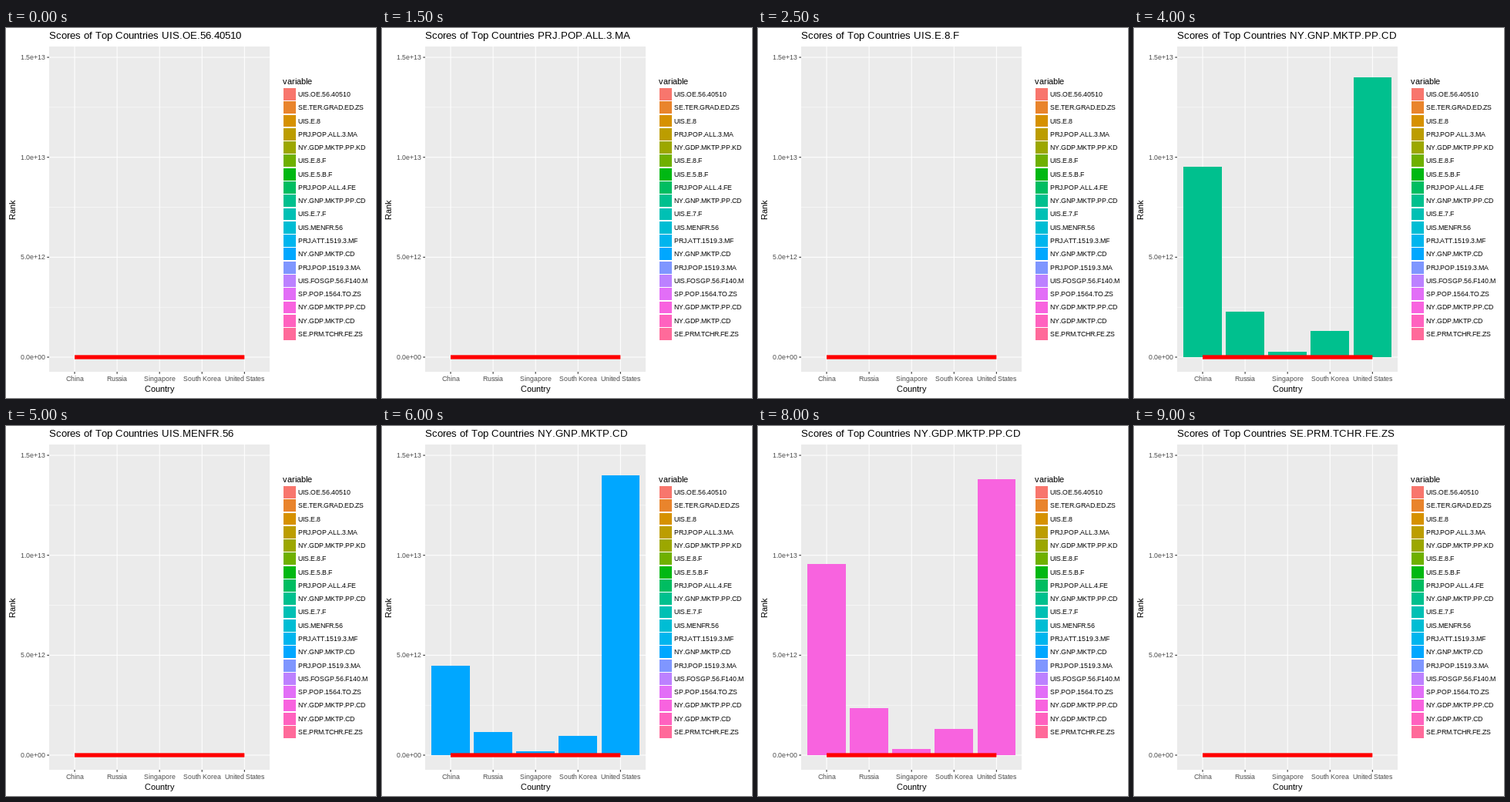
A matplotlib script that plays this animation: 480 px wide and 480 px high, repeating every 9.5 s.

```python
import numpy as np
import matplotlib.pyplot as plt
from matplotlib.animation import FuncAnimation
from matplotlib.patches import Rectangle
from matplotlib.textpath import text_to_path

plt.rcParams["font.family"] = "Liberation Sans"
plt.rcParams["toolbar"] = "None"

SIZE, DPI = 480, 72
LEFT, TOP, RIGHT, BOTTOM = 56, 24, 342, 446
ZERO, PER_TRILLION = 427.0, 25.93
UNIT = 55.08
COUNTRIES = ["China", "Russia", "Singapore", "South Korea", "United States"]
CENTERS = [55.98 + UNIT * (i + 0.6) for i in range(5)]

CODES = """UIS.OE.56.40510 SE.TER.GRAD.ED.ZS UIS.E.8 PRJ.POP.ALL.3.MA
NY.GDP.MKTP.PP.KD UIS.E.8.F UIS.E.5.B.F PRJ.POP.ALL.4.FE NY.GNP.MKTP.PP.CD
UIS.E.7.F UIS.MENFR.56 PRJ.ATT.1519.3.MF NY.GNP.MKTP.CD PRJ.POP.1519.3.MA
UIS.FOSGP.56.F140.M SP.POP.1564.TO.ZS NY.GDP.MKTP.PP.CD NY.GDP.MKTP.CD
SE.PRM.TCHR.FE.ZS""".split()

# Trillions per country; every other indicator is too small to show.
VALUES = {
    4: (10.3, 2.92, 0.34, 1.42, 14.79),
    8: (9.52, 2.27, 0.27, 1.31, 14.0),
    12: (4.47, 1.16, 0.19, 0.96, 14.0),
    16: (9.56, 2.35, 0.31, 1.31, 13.8),
    17: (4.50, 1.19, 0.19, 0.97, 13.8),
}


def hcl(hue, chroma=100, lum=65):
    """Polar CIE-LUV colour as clipped sRGB."""
    a = np.radians(hue)
    xn, yn, zn = 95.047, 100.0, 108.883
    d = xn + 15 * yn + 3 * zn
    u = chroma * np.cos(a) / (13 * lum) + 4 * xn / d
    v = chroma * np.sin(a) / (13 * lum) + 9 * yn / d
    y = ((lum + 16) / 116) ** 3
    x = 9 * y * u / (4 * v)
    z = y * (12 - 3 * u - 20 * v) / (4 * v)
    m = np.array([[3.240479, -1.537150, -0.498535],
                  [-0.969256, 1.875992, 0.041556],
                  [0.055648, -0.204043, 1.057311]])
    rgb = np.clip(m @ [x, y, z], 0, 1)
    return tuple(np.where(rgb > 0.00304, 1.055 * rgb ** (1 / 2.4) - 0.055, 12.92 * rgb))


COLORS = [hcl(15 + 360 * i / len(CODES)) for i in range(len(CODES))]

fig = plt.figure(figsize=(SIZE / DPI, SIZE / DPI), dpi=DPI, facecolor="white")
ax = fig.add_axes([0, 0, 1, 1])
ax.set_xlim(0, SIZE)
ax.set_ylim(SIZE, 0)
ax.axis("off")


def rect(x0, y0, x1, y1, color, z):
    x0, y0, x1, y1 = (int(v + 0.5) for v in (x0, y0, x1, y1))
    return ax.add_patch(Rectangle((x0, y0), x1 - x0, y1 - y0, fc=color, lw=0,
                                  antialiased=False, zorder=z))


def line(xs, ys, color, width, z):
    ax.plot(xs, ys, color=color, lw=width, solid_capstyle="butt", snap=False, zorder=z)


def label(s, x, y, size, color="black", align=0.0, vertical=False):
    """Set text on whole-pixel advances; returns the glyphs and the end of the run."""
    glyphs = [ax.text(0, 0, ch, size=size, color=color, va="baseline", ha="left",
                      rotation=90 if vertical else 0, rotation_mode="anchor", zorder=9)
              for ch in s]
    steps = [int(text_to_path.get_text_width_height_descent(
        g.get_text(), g.get_fontproperties(), False)[0] + 0.51) for g in glyphs]
    shift = align * sum(steps)
    pen = int(y + shift + 0.5) if vertical else int(x - shift + 0.5)
    for g, step in zip(glyphs, steps):
        # Just under half a pixel back, so the side bearing rounds down.
        g.set_position((x - 0.49, pen) if vertical else (pen - 0.49, y))
        pen += -step if vertical else step
    return glyphs, pen


# Panel and grid
rect(LEFT, TOP, RIGHT, BOTTOM, "#EBEBEB", 0)
for k in range(1, 6, 2):
    y = ZERO - 2.5 * k * PER_TRILLION
    line([LEFT, RIGHT], [y, y], "white", 0.53, 1)
for k, text in enumerate(["0.0e+00", "5.0e+12", "1.0e+13", "1.5e+13"]):
    y = ZERO - 5 * k * PER_TRILLION
    line([LEFT, RIGHT], [y, y], "white", 1.07, 2)
    line([LEFT - 2.75, LEFT], [y, y], "#333333", 1.07, 2)
    label(text, 51, int(y + 3.4), 8.8, "#4D4D4D", align=1)
for x, name in zip(CENTERS, COUNTRIES):
    line([x, x], [TOP, BOTTOM], "white", 1.07, 2)
    line([x, x], [BOTTOM, BOTTOM + 2.75], "#333333", 1.07, 2)
    label(name, x, 458, 8.8, "#4D4D4D", align=0.5)

line([CENTERS[0], CENTERS[-1]], [ZERO, ZERO], "red", 5.33, 5)
label("Country", 199.2, 472, 11, align=0.5)
label("Rank", 13, 235, 11, align=0.5, vertical=True)

# Legend
label("variable", 359, 73, 11)
for i, (code, color) in enumerate(zip(CODES, COLORS)):
    y = 85.95 + 17.28 * i
    rect(360, y - 7.93, 376, y + 7.93, color, 1)
    label(code, 379, int(y + 3.5), 8.8)

# Animated parts
_, title_end = label("Scores of Top Countries ", LEFT, 14, 13.2)
titles = [label(code, title_end, 14, 13.2)[0] for code in CODES]
bars = [rect(x - 0.45 * UNIT, ZERO, x + 0.45 * UNIT, ZERO, "white", 3) for x in CENTERS]


def update(n):
    for i, glyphs in enumerate(titles):
        for g in glyphs:
            g.set_visible(i == n)
    values = VALUES.get(n)
    for i, bar in enumerate(bars):
        bar.set_visible(values is not None)
        if values:
            bar.set_height(-round(values[i] * PER_TRILLION))
            bar.set_facecolor(COLORS[n])
    return bars


anim = FuncAnimation(fig, update, frames=len(CODES), init_func=lambda: update(0),
                     interval=500, repeat=True, repeat_delay=0, blit=False)
plt.show()
```
